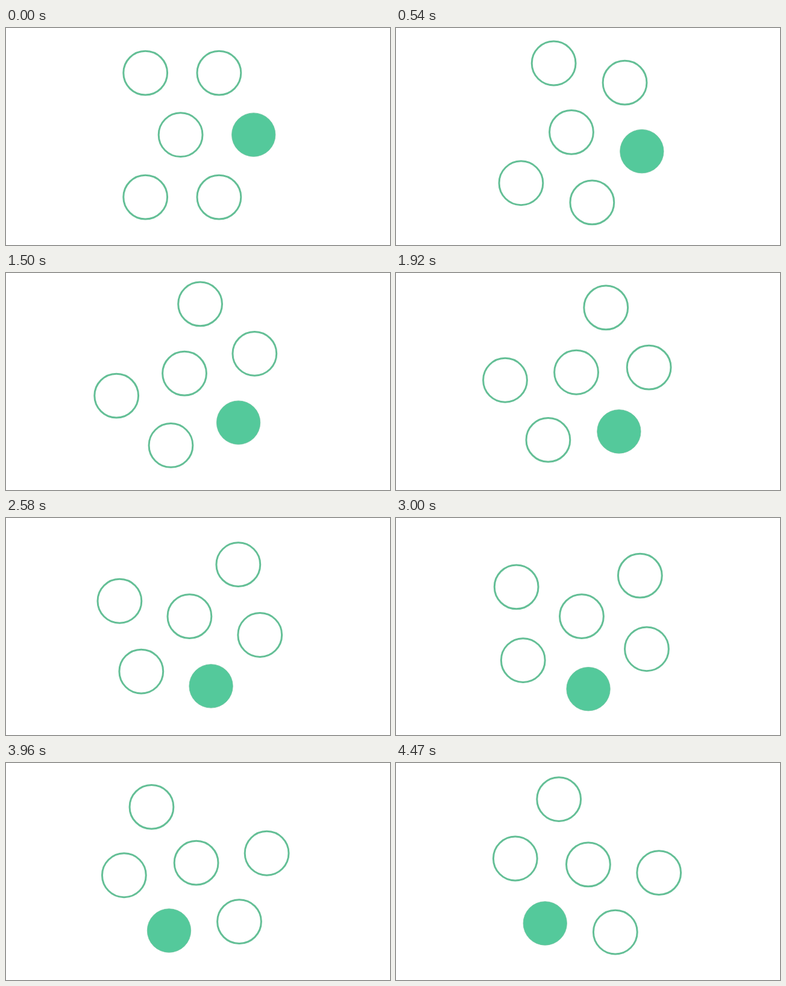
These frames come from a looping animation (637 by 360 pixels, 4500 ms). An HTML page with a canvas:

```html
<!DOCTYPE html>
<html lang="en">
<head>
<meta charset="utf-8">
<title>Turning circles</title>
<style>
  html, body { margin: 0; width: 100%; height: 100%; overflow: hidden; background: #fff; }
  canvas { display: block; }
</style>
</head>
<body>
<canvas id="stage" width="637" height="360"></canvas>
<script>
const ctx = document.getElementById('stage').getContext('2d');
const LOOP = 4500;
const STEP = 30;
const DEGREES_PER_MS = 0.02826;
const PIVOT = { x: 306.5, y: 180.2 };

// Circle centres relative to the pivot, before any rotation.
const rings = [
  [-75.3, -105.6], [46.9, -105.6],
  [-16.9, -3],
  [-75.3, 100.4], [46.9, 100.4]
];
const disc = [104.2, -3.1];

function place([x, y], angle) {
  const c = Math.cos(angle), s = Math.sin(angle);
  return [PIVOT.x + x * c - y * s, PIVOT.y + x * s + y * c];
}

function circle([x, y], radius) {
  ctx.beginPath();
  ctx.arc(x, y, radius, 0, Math.PI * 2);
}

function draw(time) {
  const t = Math.floor((time % LOOP) / STEP) * STEP;
  const angle = t * DEGREES_PER_MS * Math.PI / 180;

  ctx.fillStyle = '#fff';
  ctx.fillRect(0, 0, 637, 360);

  ctx.strokeStyle = '#64bf96';
  ctx.lineWidth = 3;
  for (const ring of rings) {
    circle(place(ring, angle), 36.4);
    ctx.stroke();
  }

  circle(place(disc, angle), 36.2);
  ctx.fillStyle = '#54c99b';
  ctx.fill();
  ctx.strokeStyle = '#6fc39f';
  ctx.lineWidth = 0.8;
  ctx.stroke();
}

const start = performance.now();
function tick() {
  draw(performance.now() - start);
  requestAnimationFrame(tick);
}
tick();
</script>
</body>
</html>
```
